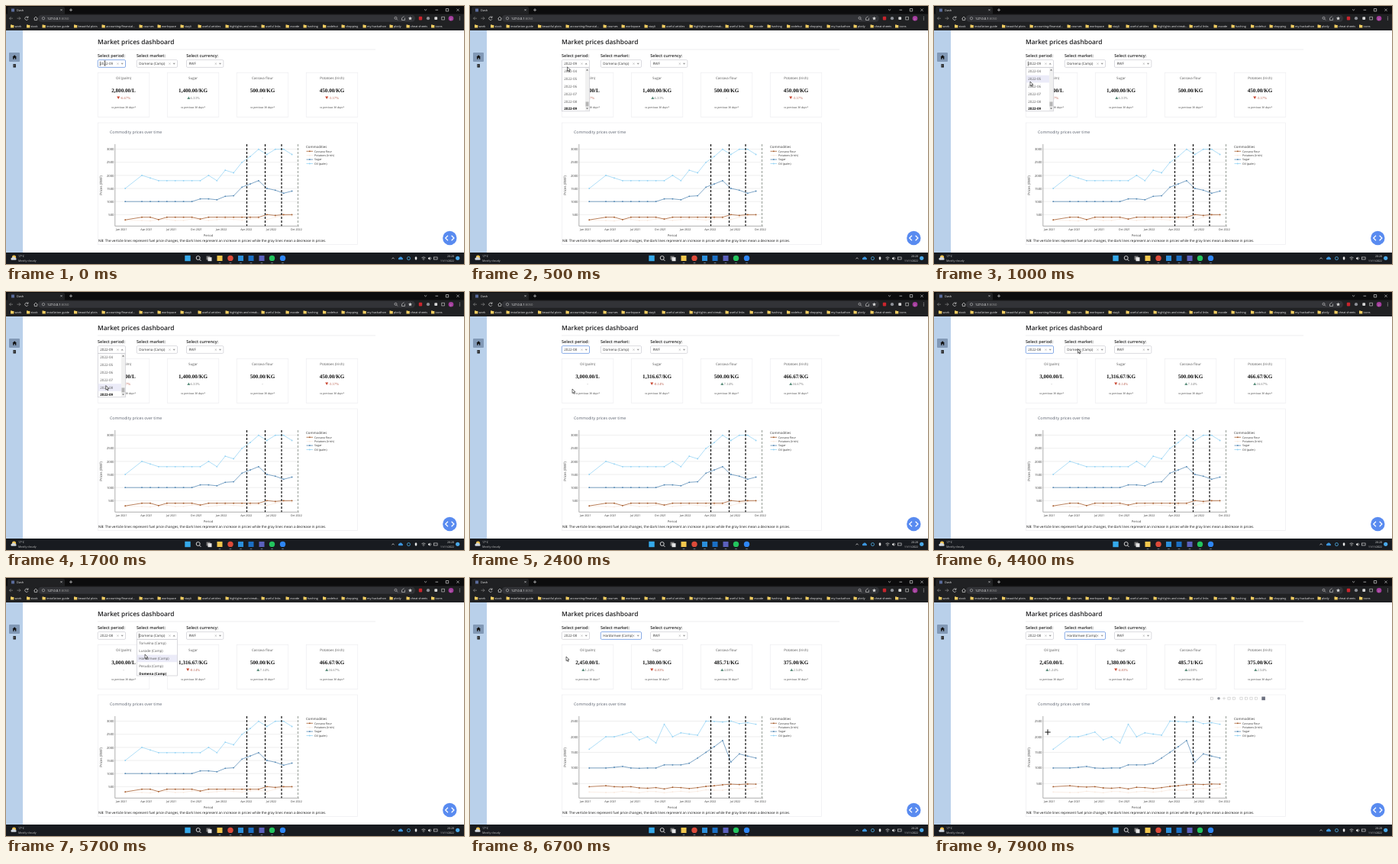
Write an HTML page that moves like this. It is 600 px wide and 338 px high and loops after 8000 ms.

```html
<!DOCTYPE html>
<html lang="en">
<head>
<meta charset="utf-8">
<title>Market prices dashboard</title>
<style>
  html, body { margin: 0; height: 100%; overflow: hidden; background: #fff; }
  svg { display: block; width: 100vw; height: 100vh; }
  text { font-family: "Open Sans", sans-serif; text-rendering: geometricPrecision; white-space: pre; }
  .serif { font-family: "Liberation Serif", serif; }
</style>
</head>
<body>
<svg id="stage" viewBox="0 0 600 338">
  <g id="chrome"></g>
  <g id="page"></g>
  <g id="cursor"></g>
</svg>
<script>
const LOOP = 8000;
const $ = id => document.getElementById(id);

// Drawing helpers, each returns SVG markup
const rect = (x, y, w, h, fill, more = '') =>
  `<rect x="${x}" y="${y}" width="${w}" height="${h}" fill="${fill}" ${more}/>`;
const circle = (x, y, r, fill, more = '') =>
  `<circle cx="${x}" cy="${y}" r="${r}" fill="${fill}" ${more}/>`;
const path = (d, stroke, width = 0.7, more = '') =>
  `<path d="${d}" stroke="${stroke}" stroke-width="${width}" fill="none" ${more}/>`;
const shape = (d, fill) => `<path d="${d}" fill="${fill}"/>`;
const text = (s, x, y, size, fill = '#222', more = '') =>
  `<text x="${x}" y="${y}" font-size="${size}" fill="${fill}" ${more}>${s}</text>`;
const MID = 'text-anchor="middle"';
const END = 'text-anchor="end"';
const cross = (x, y, r, color, width = 0.6) =>
  path(`M${x - r} ${y - r}l${2 * r} ${2 * r}m0 ${-2 * r}l${-2 * r} ${2 * r}`, color, width);
const flat = (n, v) => Array(n).fill(v);

// Browser frame
const bookmarks = [
  ['work', 11.5], ['stack', 32.5], ['installation guide', 53], ['beautiful plots', 94.5],
  ['accounting/financial...', 131], ['courses', 180], ['workspace', 204], ['stayli', 234],
  ['useful articles', 257], ['highlights and streak...', 293], ['useful links', 340],
  ['vscode', 372], ['hashing', 395], ['codehut', 420.5], ['shopping', 445],
  ['my-hackathon', 473], ['plotly', 508], ['cheat sheets', 530], ['icons', 562.5]
];

function browser() {
  const ink = '#d5d5d5';
  return rect(0, 0, 600, 32, '#0c0c0d') +
    rect(2, 1, 75, 11, '#202123', 'rx="2"') + rect(0, 10.5, 600, 21.5, '#202123') +
    rect(42, 11.8, 494, 9, '#323337', 'rx="4.5"') +
    rect(7, 3.5, 4, 4, '#5a6b9a') + text('Dash', 14, 6.7, 3.8, '#eee') +
    cross(72.5, 5.2, 1.1, ink) + path('M83 5.2h4m-2 -2v4', ink) +
    path('M548 4.3l1.6 1.5 1.6 -1.5M562.5 5.2h3.6M576.3 3.5h3.4v3.4h-3.4z', ink) +
    cross(592, 5.2, 1.7, ink) +
    path('M9 16.2h-4.5m2 -2l-2 2 2 2', '#8a8a8a') + path('M14.5 16.2h4.5m-2 -2l2 2 -2 2', '#8a8a8a') +
    path('M28.8 15a2.2 2.2 0 1 0 .2 2.2M29 13.4v1.9h-1.9', ink) +
    path('M36.6 16.4l2.4 -2.4 2.4 2.4M37.3 16v2.6h3.4v-2.6', ink) +
    circle(49, 16.2, 1.7, 'none', `stroke="${ink}" stroke-width=".5"`) +
    text('127.0.0.1<tspan fill="#999">:8050</tspan>', 54, 17.7, 4.2, '#fff') +
    circle(510.5, 15.8, 1.5, 'none', `stroke="${ink}" stroke-width=".6"`) +
    path('M511.6 17l1.5 1.5M518.5 15.5v3h4v-3M519 15.5l2.5 -2', ink, 0.6) +
    shape('M529.5 13.7l.7 1.6 1.8 .2 -1.3 1.2 .4 1.8 -1.6 -.9 -1.6 .9 .4 -1.8 -1.3 -1.2 1.8 -.2z', ink) +
    rect(540.8, 13.8, 4.4, 4.8, '#c9252d', 'rx="1"') + circle(553, 16.2, 2.1, '#8d9097') +
    rect(561.3, 14.2, 3.8, 3.8, ink, 'rx=".8"') +
    rect(570.8, 14.2, 3.8, 3.8, 'none', `stroke="${ink}" stroke-width=".6"`) +
    circle(583, 16.2, 3.3, '#a33c9c') + text('J', 583, 17.6, 3.6, '#fff', MID) +
    [14.3, 16.2, 18.1].map(y => circle(594.3, y, 0.5, ink)).join('') +
    bookmarks.map(([name, x]) =>
      shape(`M${x - 5.5} 24.4h1.7l.6 .6h2v3.4h-4.3z`, '#f1cd62') + text(name, x, 27.7, 3.75, '#f0f0f0')).join('');
}

function taskbar() {
  const ink = '#e6e6e6';
  const apps = [
    [280, '#f3c74d'], [294, '#dd4b39', 1], [307.5, '#2b8fdb'], [321, '#1b6fc4'],
    [335, '#5b61bd'], [348.5, '#23c45e', 1], [362.5, '#2e86f5', 1]
  ];
  return rect(0, 323, 600, 15, '#181b20') +
    circle(10.5, 329.2, 2.6, '#f0c24f') +
    shape('M7 332.7a1.7 1.7 0 0 1 1 -3 2.4 2.4 0 0 1 4.3 .6 1.2 1.2 0 0 1 .3 2.4z', '#cfd6de') +
    text('17°C', 16, 329.4, 3.6, ink) + text('Mostly cloudy', 16, 334.6, 3.7, '#c4c4c4') +
    rect(234.3, 326.8, 7.4, 7.4, '#35a9ea') +
    circle(251.7, 330, 2.5, 'none', `stroke="${ink}" stroke-width=".9"`) + path('M253.5 332l2 2', ink, 0.9) +
    rect(262.5, 327.5, 5, 5, '#777') + rect(264.5, 329.2, 5, 5, ink) +
    apps.map(([x, c, round]) => (round ? circle(x, 330.4, 3.7, c) : rect(x - 3.5, 327, 7, 7, c)) +
      rect(x - 1.3, 336, 2.6, 0.7, '#8fa0ad')).join('') +
    path('M505.5 331.4l1.6 -1.7 1.6 1.7', ink) +
    shape('M514.5 332.3a1.6 1.6 0 0 1 .7 -2.8 2.2 2.2 0 0 1 4 .5 1.2 1.2 0 0 1 0 2.3z', '#3c95dd') +
    circle(527.5, 330.6, 2, 'none', 'stroke="#4ba4d8" stroke-width=".9"') +
    rect(535.8, 328.5, 2.5, 4, ink, 'rx="1"') +
    path('M544.5 329.8q2.5 -2 5 0M545.5 331.2q1.5 -1.2 3 0', ink, 0.6) + circle(547, 332.3, 0.5, ink) +
    shape('M553 329.7h1l1.5 -1.3v4.5l-1.5 -1.3h-1z', ink) + path('M556.5 329.4q1 1.2 0 2.4', ink, 0.5) +
    rect(560.5, 329, 4.6, 3, 'none', `stroke="${ink}" stroke-width=".6"`) +
    text('20:28', 587, 329.4, 3.5, ink, END) + text('11/11/2022', 587, 334.8, 3.4, ink, END) +
    circle(591.7, 330.3, 2.6, '#4aa8e8');
}

function sidebar() {
  return rect(0, 32, 22, 291, '#b9d0ea') + rect(4, 61, 14, 12, '#8299b6', 'rx="1"') +
    shape('M8.4 67l2.8 -2.7 2.8 2.7h-.7v2.7h-1.4v-1.6h-1.4v1.6h-1.4v-2.7z', '#111') +
    rect(9.4, 76, 3.6, 4.6, '#222', 'rx=".5"') + path('M10.3 77.2h.6m.8 0h.6M10.3 78.7h.6m.8 0h.6', '#cfdcee', 0.6);
}

// Dashboard data
const markets = ['Torivelna', 'Lusode', 'Hardomwe', 'Pesuda', 'Domena'].map(n => n + ' (Camp)');
const periods = [4, 5, 6, 7, 8, 9].map(m => '2022-0' + m);
const goods = ['Oil (palm)', 'Sugar', 'Cassava flour', 'Potatoes (Irish)'];
const cardSets = [
  [['2,800.00', -6.67], ['1,400.00', 6.33], ['500.00', 0], ['450.00', -3.57]],
  [['3,000.00', 0], ['1,316.67', -8.14], ['500.00', 7.14], ['466.67', 16.67]],
  [['2,450.00', 1.24], ['1,380.00', -4.83], ['485.71', 4.08], ['375.00', 2.54]]
];
const colors = { oil: '#94d3f4', sugar: '#5488b4', cassava: '#a55a2a', potato: '#f8e9de' };

// Monthly prices from January 2021; February 2021 has no record
const charts = [{
  top: 3000, base: 273.3, scale: 0.03426,
  oil: [1500, null, 2000, 1900, ...flat(6, 1800), 2000, 1800, 2200, 2100, 2500, 2720, 3000, 2800, 3000, 3000, 2800],
  sugar: [1000, null, ...flat(7, 1000), 1100, 1100, 1070, 1200, 1220, 1550, 1670, 1800, 1500, 1433, 1317, 1400],
  cassava: [300, null, 400, 400, 310, ...flat(4, 400), 330, ...flat(7, 400), 500, 467, 500, 500],
  potato: i => i > 17 ? [400, 467, 450][i - 18] : 280 + 30 * Math.sin(i * 1.7) + i * 3
}, {
  top: 2500, base: 269.3, scale: 0.0409,
  oil: [1600, null, 2000, 2000, 2070, 2150, 1900, 2000, 1800, 2400, 2000, 2125, 2085, 2050, 2500, 2490, 2470, 2500, 2420, 2450, 2400],
  sugar: [1000, null, 1000, 1020, 1050, 1000, 990, 1000, 1000, ...flat(3, 1100), 1150, 1320, 1500, 1680, 1880, 1190, 1450, 1380, 1320],
  cassava: [400, null, 430, 400, 390, 400, 360, 350, 370, 330, 380, 370, 340, 370, 410, 430, 460, 480, 467, 486, 480],
  potato: i => 230 + 25 * Math.sin(i * 1.9) + Math.max(0, i - 11) * 15
}];

function series(chart, name) {
  const data = chart[name];
  const points = flat(21, 0)
    .map((_, i) => [156.2 + 10.92 * i, i === 1 ? null : data.call ? data(i) : data[i]])
    .filter(p => p[1] !== null)
    .map(([x, v]) => [x.toFixed(1), (chart.base - (v - 500) * chart.scale).toFixed(1)]);
  return path('M' + points.join('L'), colors[name], 0.75) +
    points.map(([x, y]) => circle(x, y, 0.9, colors[name])).join('');
}

function graph(chart) {
  let s = rect(120.5, 153, 340, 159.5, '#fff', 'stroke="#ededf0" stroke-width=".7"') +
    text('Commodity prices over time', 136, 167.1, 5.2, '#5a616e');
  for (let v = 500; v <= chart.top; v += 500) {
    const y = chart.base - (v - 500) * chart.scale;
    s += path(`M143 ${y}H384`, '#e2e2e2', 0.6) + text(v, 141.5, y + 1.6, 4.2, '#444', END);
  }
  s += path('M142.8 181V288.3H384', '#777', 0.6);
  ['Jan 2021', 'Apr 2021', 'Jul 2021', 'Oct 2021', 'Jan 2022', 'Apr 2022', 'Jul 2022', 'Oct 2022']
    .forEach((m, i) => s += text(m, 151.3 + 32.7 * i, 294.1, 3.65, '#333', MID));
  s += text('Period', 265, 301.6, 4.1, '#444', MID) +
    text('Prices (RWF)', 0, 0, 4.5, '#444', MID + ' transform="translate(126.3 235) rotate(-90)"');
  s += ['potato', 'cassava', 'sugar', 'oil'].map(n => series(chart, n)).join('');
  [315.5, 339.5, 361, 382.5].forEach((x, i) =>
    s += path(`M${x} 181V288.3`, i < 3 ? '#111' : '#a3a9a3', 1.2, 'stroke-dasharray="3 2"'));
  s += text('Commodities', 393, 185.8, 4.4, '#333');
  [['Cassava flour', 'cassava'], ['Potatoes (Irish)', 'potato'], ['Sugar', 'sugar'], ['Oil (palm)', 'oil']]
    .forEach(([label, name], i) => {
      const y = 190.3 + 5.4 * i;
      s += path(`M393.5 ${y}h8.5`, colors[name], 0.75) + circle(397.8, y, 0.9, colors[name]) +
        text(label, 404, y + 1.3, 3.7, '#333');
    });
  return s + text('NB: The verticle lines represent fuel price changes, the dark lines represent an increase in prices ' +
    'while the gray lines mean a decrease in prices.', 121, 308.8, 4.5, '#111');
}

function card([price, change], i) {
  const x = 120.3 + 91 * i, mid = x + 33.7, down = change < 0;
  const label = change.toFixed(2) + '%';
  const left = mid - (label.length * 2.2 + 4.4) / 2;
  const tri = down ? `M${left} 118.6h4l-2 3.4z` : `M${left} 122h4l-2 -3.4z`;
  return rect(x, 87.3, 67.5, 58.3, '#fff', 'stroke="#ededf0" stroke-width=".7"') +
    text(goods[i], mid, 96.3, 4.5, '#555', MID) +
    text(price + (i ? '/KG' : '/L'), mid, 113, 7.1, '#111', MID + ' class="serif" font-weight="700"') +
    (change
      ? shape(tri, down ? '#c8442f' : '#5d8f7d') + text(label, left + 4.3, 122.1, 4.7, down ? '#b9604f' : '#777', 'class="serif"')
      : text('-', mid, 122, 4.7, '#777', MID + ' class="serif"')) +
    text('vs previous 30 days*', mid, 134.4, 3.8, '#333', MID + ' class="serif" font-style="italic"');
}

function dropdown(x, w, value, focus, open, caret) {
  const end = x + w;
  return rect(x, 70.6, w, 9.8, '#fff', `rx="1.3" stroke="${focus && !open ? '#6d97e0' : '#d2d2d8'}" stroke-width=".8"`) +
    text(value, x + 3, 77.2, 4.5, '#333') +
    (caret ? path(`M${x + 3} 72.7v6`, '#222', 0.6) : '') +
    cross(end - 10, 75.6, 1.1, '#999', 0.5) +
    shape(open ? `M${end - 6} 76.5h3.4l-1.7 -1.9z` : `M${end - 6} 74.8h3.4l-1.7 1.9z`, '#999');
}

function menu(x, w, items, chosen, hover) {
  return rect(x, 80.6, w, items.length * 9.8 - 1.6, '#fff', 'stroke="#c9c9cf" stroke-width=".7"') +
    items.map((item, i) =>
      (i === hover ? rect(x + 0.4, 81 + 9.8 * i, w - 0.8, 9.6, '#ebebf8') : '') +
      text(item, x + 3, 87.4 + 9.8 * i, 4.5, i === chosen ? '#111' : '#555', i === chosen ? 'font-weight="700"' : '')).join('');
}

function dashboard(s) {
  let out = text('Market prices dashboard', 120, 50.3, 8.35, '#1d1d1f', 'font-weight="600"') +
    path('M120 57H484', '#e2e2e6', 0.6) +
    [['period', 120], ['market', 171], ['currency', 236.3]].map(([n, x]) =>
      text(`Select ${n}:`, x, 66.7, 5.5, '#222', 'font-weight="600"')).join('') +
    cardSets[s.cards].map(card).join('') + graph(charts[s.chart]) +
    dropdown(120.3, 36.2, periods[s.period], s.focus === 0, s.open === 0, s.focus === 0 && s.caret) +
    dropdown(171.3, 53.2, markets[s.market], s.focus === 1, s.open === 1, s.focus === 1 && s.caret) +
    dropdown(236.5, 48.3, 'RWF', false, false, false);
  if (s.open === 0) {
    out += menu(120.3, 36.2, periods, 5, s.hover) + rect(151, 81, 5, 56, '#f1f1f1') +
      rect(151.5, 125.5, 4, 6, '#b5b5b5') + shape('M152 84.5h3l-1.5 -1.8z', '#666') + shape('M152 133.5h3l-1.5 1.8z', '#666');
  }
  if (s.open === 1) out += menu(171.3, 53.2, markets, 4, s.hover);
  if (s.toolbar) {
    out += [364, 373, 380, 386.5, 393, 402.5, 409, 415.5, 422].map((x, i) =>
      i === 1 ? circle(x, 157.7, 1.8, '#8b8f98')
        : i === 2 ? path(`M${x - 2} 157.7h4m-2 -2v4`, '#ccc', 0.7)
          : rect(x - 1.6, 156.2, 3.2, 3, 'none', 'stroke="#ccc" stroke-width=".7"')).join('') +
      rect(429.3, 155.5, 4.6, 4.6, '#6d7180');
  }
  return out + circle(581.3, 304, 9.2, '#598bf0') +
    path('M579 300.8l-3.3 3.2 3.3 3.2M583.6 300.8l3.3 3.2 -3.3 3.2', '#fff', 1.2);
}

// Pointer route: time, x, y
const route = [
  [0, 129.5, 75], [350, 129, 75.5], [650, 126, 84], [1000, 126, 99], [1400, 128, 115], [1750, 131, 123],
  [2100, 134, 127], [2900, 134, 127], [3600, 160, 105], [4300, 188.5, 74.5], [4700, 188.5, 74.5],
  [5200, 184, 88], [5700, 182, 100], [6100, 181, 104], [6700, 126, 103], [7100, 130, 126],
  [7600, 146, 188], [7900, 149, 202], [8000, 149, 202]
];

function pointerAt(t) {
  const i = route.findIndex(k => k[0] > t);
  const [t0, x0, y0] = route[i - 1], [t1, x1, y1] = route[i];
  const u = (t - t0) / (t1 - t0), e = u * u * (3 - 2 * u);
  return [x0 + (x1 - x0) * e, y0 + (y1 - y0) * e];
}

const pointers = {
  arrow: '<path d="M0 0V5.6L1.3 4.4 2.2 6.5 3.1 6.1 2.2 4.1H4z" fill="#fff" stroke="#111" stroke-width=".6"/>',
  beam: path('M-1.2 -3h2.4M0 -3v6M-1.2 3h2.4', '#222', 0.6),
  plus: path('M-3.6 0h7.2M0 -3.6v7.2', '#111', 1)
};

let lastKey = '', lastPointer = '';
function frame(now) {
  const t = now % LOOP, [x, y] = pointerAt(t);
  const open = t >= 500 && t < 1800 ? 0 : t >= 4600 && t < 6150 ? 1 : -1;
  const state = {
    open,
    focus: t < 4600 ? 0 : 1,
    hover: open < 0 || y < 81 ? -1 : Math.floor((y + 1.5 - 81) / 9.8),
    caret: (open >= 0 || t < 500) && t % 1000 < 500 || t >= 5500 && t < 6000,
    period: t < 1800 ? 5 : 4,
    market: t < 6150 ? 4 : 2,
    cards: t < 1900 ? 0 : t < 6300 ? 1 : 2,
    chart: t < 6300 ? 0 : 1,
    toolbar: y > 153
  };
  const key = JSON.stringify(state);
  if (key !== lastKey) $('page').innerHTML = dashboard(state);
  lastKey = key;

  const pointer = t < 500 ? 'beam' : y > 181 ? 'plus' : 'arrow';
  if (pointer !== lastPointer) $('cursor').innerHTML = pointers[pointer];
  lastPointer = pointer;
  $('cursor').setAttribute('transform', `translate(${x.toFixed(2)} ${y.toFixed(2)})`);
  requestAnimationFrame(frame);
}

$('chrome').innerHTML = browser() + sidebar() + taskbar();
frame(0);
</script>
</body>
</html>
```
